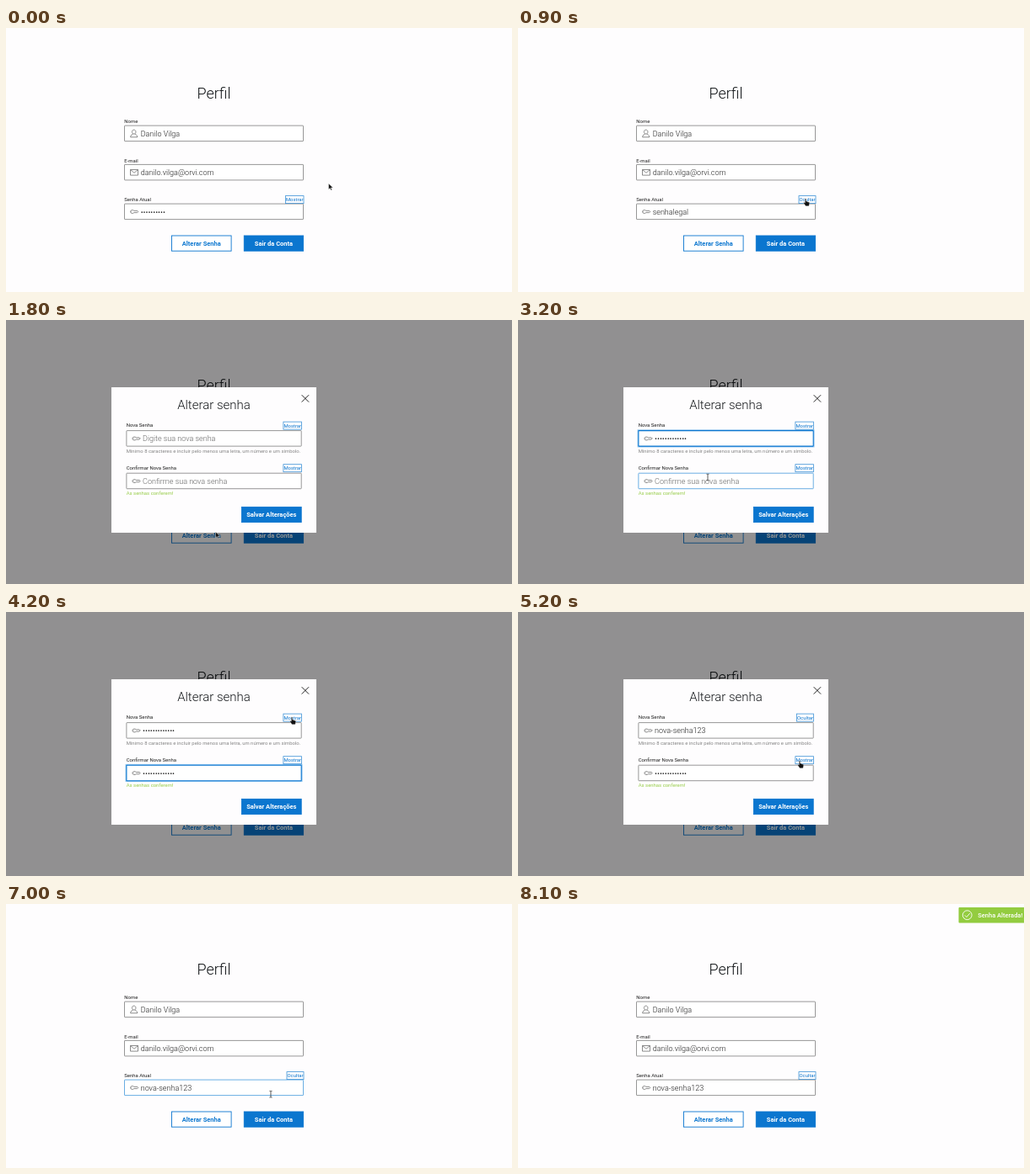
These frames come from a looping animation (600x314 px, 8500 ms). An HTML page:

```html
<!DOCTYPE html>
<html lang="pt-BR">
<head>
<meta charset="utf-8">
<title>Perfil</title>
<style>
html, body { margin: 0; width: 100%; height: 100%; overflow: hidden; background: #fefdfe; }
svg { display: block; width: 600px; height: 314px; font-family: Roboto, sans-serif; }
.title { font-size: 18px; font-weight: 300; text-anchor: middle; fill: #14171a; }
.sub { font-size: 15px; }
.label { font-size: 5.95px; fill: #1c1c1c; }
.hint { font-size: 5.95px; fill: #858585; }
.ok { font-size: 5.95px; fill: #96cc46; }
.value { font-size: 9px; font-weight: 300; fill: #222; }
.empty { fill: #666; }
.box { fill: #fff; stroke: #8c8c8c; stroke-width: .9; }
.box.hover { stroke: #5aa5e0; }
.box.focus { stroke: #0b76cf; stroke-width: 1.1; }
.glow { fill: none; stroke: #8fc4ee; stroke-width: 2.6; opacity: 0; }
.icon { fill: none; stroke: #666; stroke-width: .75; stroke-linejoin: round; }
.link text { font-size: 5.95px; fill: #0b76cf; text-anchor: end; }
.link rect { fill: none; stroke: #3f93d8; stroke-width: .8; }
.btn { font-size: 7.5px; font-weight: 600; text-anchor: middle; }
.btn .face { stroke: #0b76cf; stroke-width: .9; }
.btn.hover text { text-decoration: underline; }
</style>
</head>
<body>
<svg id="stage" viewBox="0 0 600 314">
  <rect width="600" height="314" fill="#fefdfe"/>
  <g id="page"></g>
  <g id="modal">
    <rect width="600" height="314" fill="#000" fill-opacity=".43"/>
    <rect x="125" y="80" width="243" height="173" fill="#fefdfe"/>
    <path d="M350.7 89.2l8.4 8.4m0-8.4l-8.4 8.4" stroke="#222" stroke-width="1"/>
  </g>
  <g id="toast">
    <rect x="522.5" y="4" width="80" height="18.5" rx="1" fill="#93cc40"/>
    <g fill="none" stroke="#fff" stroke-width=".9">
      <circle cx="532.7" cy="13.2" r="5.4"/>
      <path d="M529.8 13.4l2.1 2.1 3.9-4.4"/>
    </g>
    <text x="545.3" y="15.8" font-size="7.5" font-weight="500" fill="#fff">Senha Alterada!</text>
  </g>
  <g id="cursor">
    <path id="arrow" d="M0 0v7l1.7-1.5 1.1 2.4 1.2-.5-1.1-2.4h2.3z" fill="#111" stroke="#fff" stroke-width=".4"/>
    <path id="beam" d="M-1.5-3.8h1.1l.4.4.4-.4h1.1M0-3.4v6.8M-1.5 3.8h1.1l.4-.4.4.4h1.1" fill="none" stroke="#222" stroke-width=".75"/>
    <path id="hand" d="M-.7.2q.7-.8 1.4 0v2.9l1.1.1.2.4 1.1.1.2.4 1 .2q.5.3.4 1.2l-.7 3.3h-3.9l-2.2-3.4q-.6-1 .2-1.2l1.2.8z" fill="#111" stroke="#fff" stroke-width=".35"/>
  </g>
</svg>
<script>
const NS = 'http://www.w3.org/2000/svg';
const $ = id => document.getElementById(id);
const page = $('page'), modal = $('modal');

function add(parent, tag, attrs, text) {
  const el = document.createElementNS(NS, tag);
  for (const k in attrs) el.setAttribute(k, attrs[k]);
  if (text) el.textContent = text;
  parent.appendChild(el);
  return el;
}

const label = (parent, x, y, cls, text) => add(parent, 'text', { x, y, class: cls }, text);

const icons = {
  user: 'M4.5-4.4c3 0 3 5 0 5s-3-5 0-5M3.4.1c0 1.2-3 1-3 4.2h8.2c0-3.2-3-3-3-4.2',
  mail: 'M.3-3.3h9v6.6h-9zM.3-3.3l4.5 3.8 4.5-3.8',
  key: 'M4.6-1.1C3.8-2.6.3-2.2.3 0s3.5 2.6 4.3 1.1h3.7L9.7 0 8.6-1.1zM1.5-.3v.6'
};

function field(parent, x, y, w, icon, text) {
  const g = add(parent, 'g'), h = 18.5;
  const shape = { x, y, width: w, height: h };
  const glow = add(g, 'rect', { ...shape, class: 'glow' });
  const box = add(g, 'rect', { ...shape, rx: .5, class: 'box' });
  add(g, 'path', { d: icons[icon], class: 'icon', transform: `translate(${x + 6.7} ${y + 9.4})` });
  const value = label(g, x + 19.2, y + 12.6, 'value', text);
  return {
    parent, area: [x, y, w, h], kind: 'beam',
    set(hover, focus) {
      box.setAttribute('class', 'box' + (focus ? ' focus' : hover ? ' hover' : ''));
      glow.style.opacity = focus ? 1 : 0;
    },
    write(s, empty) {
      value.textContent = s;
      value.setAttribute('class', empty ? 'value empty' : 'value');
    }
  };
}

function link(parent, right, y) {
  const g = add(parent, 'g', { class: 'link' });
  const frame = add(g, 'rect', { y, height: 9 });
  const text = add(g, 'text', { x: right - .4, y: y + 6.6 });
  return {
    parent, area: [right - 21.5, y, 21.5, 9], kind: 'hand', set() {},
    show(open) {
      const w = open ? 20 : 21.6;
      text.textContent = open ? 'Ocultar' : 'Mostrar';
      frame.setAttribute('x', right - w);
      frame.setAttribute('width', w);
    }
  };
}

function button(parent, x, y, w, text, solid) {
  const g = add(parent, 'g', { class: 'btn' }), h = 18.2;
  const shape = { x, y, width: w, height: h };
  const glow = add(g, 'rect', { ...shape, class: 'glow' });
  add(g, 'rect', { ...shape, class: 'face', fill: solid ? '#0b76cf' : '#fff' });
  add(g, 'text', { x: x + w / 2, y: y + 11.8, fill: solid ? '#fff' : '#0b76cf' }, text);
  return {
    parent, area: [x, y, w, h], kind: 'hand',
    set(hover) {
      g.setAttribute('class', hover ? 'btn hover' : 'btn');
      glow.style.opacity = hover ? 1 : 0;
    }
  };
}

label(page, 246.5, 84, 'title', 'Perfil');
label(page, 140.3, 113.4, 'label', 'Nome');
label(page, 140.3, 159.7, 'label', 'E-mail');
label(page, 140.3, 206, 'label', 'Senha Atual');
const name = field(page, 140.5, 116.1, 212, 'user', 'Danilo Vilga');
const mail = field(page, 140.5, 162.4, 212, 'mail', 'danilo.vilga@orvi.com');
const pass = field(page, 140.5, 209.1, 212, 'key');
const passLink = link(page, 353, 199.6);
const change = button(page, 196.5, 247, 70.6, 'Alterar Senha');
const leave = button(page, 282.3, 247, 70.3, 'Sair da Conta', true);

label(modal, 246.5, 106, 'title sub', 'Alterar senha');
label(modal, 142.7, 127.4, 'label', 'Nova Senha');
label(modal, 142.7, 178, 'label', 'Confirmar Nova Senha');
label(modal, 142.7, 157.9, 'hint', 'Mínimo 8 caracteres e incluir pelo menos uma letra, um número e um símbolo.');
label(modal, 142.7, 208.4, 'ok', 'As senhas conferem!');
const fresh = field(modal, 142.9, 131.6, 207.3, 'key');
const again = field(modal, 142.9, 182.2, 207.3, 'key');
const freshLink = link(modal, 350.5, 121.1);
const againLink = link(modal, 350.5, 171.7);
const save = button(modal, 279.4, 222.4, 70.8, 'Salvar Alterações', true);

const parts = [name, mail, pass, passLink, change, leave, fresh, again, freshLink, againLink, save];

// time, x, y of the pointer
const path = [
  [0, 382.5, 185], [700, 341, 203], [900, 341, 203], [1700, 248.5, 252], [1800, 248.5, 252],
  [2300, 225, 141], [2900, 225, 141], [3200, 225, 187], [3700, 225, 187], [4200, 339, 125],
  [4300, 339, 125], [4600, 338, 173], [4900, 341, 186], [5200, 334, 177], [5500, 334, 177],
  [6300, 315, 228.5], [6900, 315, 228.5], [7800, 285, 163], [7900, 345, 85], [8000, 415, 8]
];

function pointer(t) {
  const i = path.findIndex(p => p[0] > t);
  if (i < 0) return path[path.length - 1].slice(1);
  const [t0, x0, y0] = path[i - 1], [t1, x1, y1] = path[i];
  const u = (t - t0) / (t1 - t0), e = u * u * (3 - 2 * u);
  return [x0 + (x1 - x0) * e, y0 + (y1 - y0) * e];
}

const dots = n => '•'.repeat(n);
const secret = 'nova-senha123';

function fill(input, toggle, t, typed, shown, prompt) {
  const filled = t >= typed, open = t >= shown;
  input.write(!filled ? prompt : open ? secret : dots(secret.length), !filled);
  toggle.show(open);
}

function draw(t) {
  const open = t >= 1800 && t < 7000;
  modal.style.display = open ? '' : 'none';

  pass.write(t >= 7000 ? secret : t >= 900 ? 'senhalegal' : dots(10));
  passLink.show(t >= 900);
  fill(fresh, freshLink, t, 2700, 4300, 'Digite sua nova senha');
  fill(again, againLink, t, 3700, 5500, 'Confirme sua nova senha');

  const [x, y] = pointer(t), layer = open ? modal : page;
  const focus = t < 2300 || t >= 4300 ? null : t < 3400 ? fresh : again;
  let kind = 'arrow';
  for (const p of parts) {
    const [px, py, w, h] = p.area;
    const hover = p.parent === layer && t < 8100 && x >= px && x <= px + w && y >= py && y <= py + h;
    if (hover) kind = p.kind;
    p.set(hover, p === focus);
  }
  for (const k of ['arrow', 'beam', 'hand']) $(k).style.display = k === kind ? '' : 'none';
  $('cursor').style.display = t < 8100 ? '' : 'none';
  $('cursor').setAttribute('transform', `translate(${x} ${y})`);

  const slide = Math.min(1, Math.max(0, (t - 7000) / 400));
  $('toast').style.display = t >= 7000 ? '' : 'none';
  $('toast').setAttribute('transform', `translate(${80 * (1 - slide) ** 2} 0)`);
}

const start = performance.now();
function tick() {
  const ms = (performance.now() - start) % 8500;
  draw(Math.floor(ms / 100) * 100);
  requestAnimationFrame(tick);
}
draw(0);
requestAnimationFrame(tick);
</script>
</body>
</html>
```
